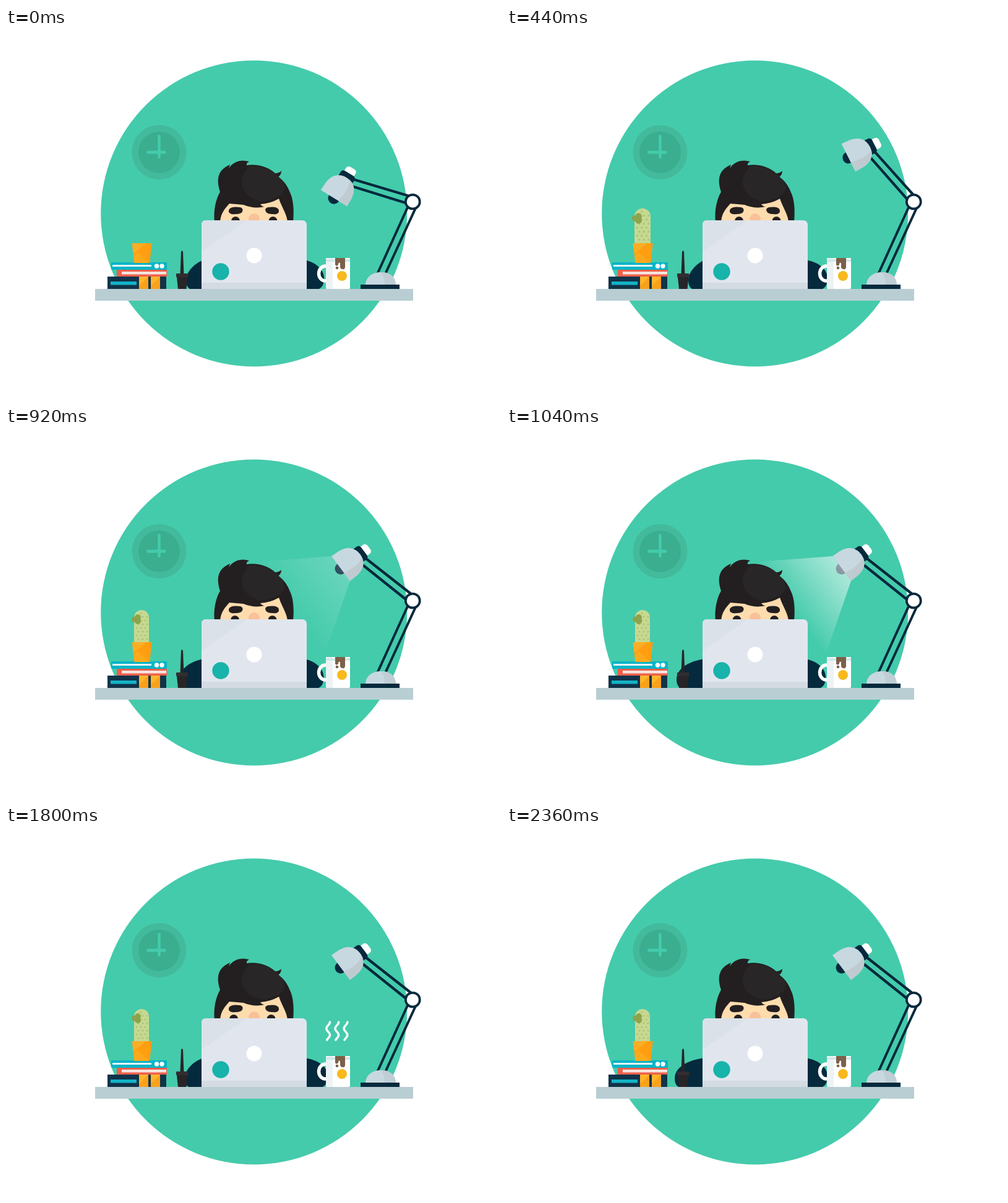
An HTML page with a canvas for the animation above (2.4 s loop, 800 by 600 pixels).

```html
<!DOCTYPE html>
<html lang="en">
<head>
<meta charset="utf-8">
<title>Late at the desk</title>
<style>
html, body { margin: 0; width: 100%; height: 100%; overflow: hidden; background: #fff; }
canvas { display: block; width: 800px; height: 600px; }
</style>
</head>
<body>
<canvas id="stage" width="800" height="600"></canvas>
<script>
const ctx = document.getElementById('stage').getContext('2d');
const LOOP = 2400, STEP = 40;
const GREEN = '#44cbab', NAVY = '#05293d', HAIR = '#231f20', WHITE = '#fff', STEEL = '#c8d8e0';

// Keyed values as [time, value] pairs, eased in and out between neighbours.
const tracks = {
  lamp: [[0, -21.5], [400, 10.5], [440, 10], [700, 0]],
  cactus: [[40, 0], [360, 1.1], [440, 1.08], [640, 1]],
  beam: [[880, 0], [980, 1], [1120, 1], [1240, 0]],
  eyes: [[0, 0], [440, 4], [760, -3.3], [1040, 0.5], [1360, 0.5], [1800, -3], [2360, 2.5]],
  leftArm: [[0, 291], [220, 273], [440, 293], [600, 272], [760, 289], [1040, 274], [1200, 291],
    [1360, 273], [1510, 291], [1650, 273], [1800, 289], [1990, 272], [2170, 291], [2360, 271]],
  rightArm: [[0, 514], [440, 518], [760, 511], [1040, 515], [1360, 521], [1800, 520], [2360, 518]],
  steamHead: [[1080, 360], [1360, 339], [1760, 317]],
  steamTail: [[1340, 360], [1800, 346], [2200, 317]]
};

function valueAt(keys, t) {
  if (t <= keys[0][0]) return keys[0][1];
  for (let i = 1; i < keys.length; i++) {
    const [t0, a] = keys[i - 1], [t1, b] = keys[i];
    if (t <= t1) return a + (b - a) * (0.5 - Math.cos(Math.PI * (t - t0) / (t1 - t0)) / 2);
  }
  return keys[keys.length - 1][1];
}

function rect(color, x, y, w, h, r = 0) {
  ctx.fillStyle = color;
  ctx.beginPath();
  ctx.roundRect(x, y, w, h, r);
  ctx.fill();
}
function disc(color, x, y, r) {
  ctx.fillStyle = color;
  ctx.beginPath();
  ctx.arc(x, y, r, 0, 7);
  ctx.fill();
}
function shape(color, d) {
  ctx.fillStyle = color;
  ctx.fill(new Path2D(d));
}
function line(color, width, d, cap = 'butt') {
  ctx.strokeStyle = color;
  ctx.lineWidth = width;
  ctx.lineCap = cap;
  ctx.lineJoin = 'round';
  ctx.stroke(new Path2D(d));
}
function grouped(draw) {
  ctx.save();
  draw();
  ctx.restore();
}

function drawBackdrop() {
  rect(WHITE, 0, 0, 800, 600);
  disc(GREEN, 400.7, 300, 247.5);
  disc('#43ba9c', 247.5, 201, 44);
  disc('#3aae8f', 247.5, 201, 33.5);
  line(GREEN, 4.5, 'M247.5 175V209', 'round');
  line(GREEN, 5, 'M229.5 201H256', 'round');
}

function drawLampHead(beam) {
  const toHead = () => { ctx.translate(541, 229); ctx.rotate(53.13 * Math.PI / 180); };
  grouped(() => { toHead(); disc(NAVY, 0, 0, 9.5); });
  if (beam > 0) grouped(() => {
    const glow = ctx.createLinearGradient(541, 229, 456, 293);
    glow.addColorStop(0, 'rgba(255,255,255,.55)');
    glow.addColorStop(1, 'rgba(255,255,255,0)');
    ctx.globalAlpha = beam;
    shape(glow, 'M526 209L556 249L515 368L405 218Z');
  });
  grouped(() => {
    toHead();
    rect(WHITE, -9, -57, 18, 18, 5);
    rect(NAVY, -13, -47, 26, 16, 5);
    shape(STEEL, 'M-25 0L-24.5 -14C-23 -33 -11 -39 0 -39C11 -39 23 -33 24.5 -14L25 0Z');
    shape('#bfcbd1', 'M8 0C12 -14 12 -28 6 -38.5C15 -37 23 -30 24.5 -14L25 0Z');
  });
}

function drawLamp(t) {
  line(NAVY, 4, 'M650 288L600 398M663 289L611 402');
  shape(STEEL, 'M581 416C581 388 630 388 630 416Z');
  shape('#bfcdd4', 'M612 416C612 405 610 399 605 395C620 394 630 402 630 416Z');
  rect(NAVY, 573, 415, 63, 7);
  grouped(() => {
    ctx.translate(657, 281);
    ctx.rotate(valueAt(tracks.lamp, t) * Math.PI / 180);
    ctx.translate(-657, -281);
    line(NAVY, 4.2, 'M577 209L656 271M574 221L649 281');
    drawLampHead(valueAt(tracks.beam, t));
  });
  disc(NAVY, 657.3, 281, 13.3);
  disc(WHITE, 657.3, 281, 9.6);
}

function drawArms(t) {
  const l = valueAt(tracks.leftArm, t), r = valueAt(tracks.rightArm, t);
  shape(NAVY, `M320 375C${l + 16} 379 ${l} 393 ${l} 408Q${l} 418 ${l + 6} 422H320Z`);
  shape(NAVY, `M482 375C${r - 16} 378 ${r} 389 ${r} 405Q${r} 418 ${r - 8} 422H482Z`);
}

function drawPerson(t) {
  const gaze = valueAt(tracks.eyes, t);
  shape('#ffdcae', 'M345 270H456V318H345Z');
  disc('#f9c199', 401, 309, 9);
  disc(HAIR, 371 + gaze, 312, 7);
  disc(HAIR, 431.5 + gaze, 312, 7);
  shape(HAIR, 'M360 297C359 289 371 289 379 290Q384 292 382 297Q380 301 371 301Q361 302 360 297Z');
  shape(HAIR, 'M441 297C442 289 431 289 423 290Q417 292 420 297Q422 301 431 301Q440 302 441 297Z');
  shape(HAIR, `M337 314C335 295 339 277 346 265C340 246 341 230 362 221L360 227
    C367 216 380 212 393 216Q388 218 389 222C407 219 426 226 435 235Q441 235 445 231
    Q445 237 440 241C450 247 456 258 459 266C464 276 466 293 464 314H455
    C454 301 447 293 441 276Q427 284 411 285Q414 289 418 289Q401 293 384 286
    Q374 285 361 284C354 292 347 299 346 314Z`);
  shape('#292627', 'M393 224C386 232 381 240 381 250C381 263 393 276 411 280Q429 280 442 271C455 263 452 252 441 241Q433 232 420 227Q405 222 393 224Z');
}

function drawLaptop() {
  rect('#e1e6ee', 316, 311, 170, 116, 7);
  shape('#dae1e9', 'M316 362V318Q316 311 323 311H389Z');
  rect('#d3dbe3', 316, 412, 170, 12);
  disc(WHITE, 401, 368, 12.5);
  disc('#18b3aa', 347, 394, 13.7);
}

function drawCactus(t) {
  const size = valueAt(tracks.cactus, t);
  if (size <= 0) return;
  grouped(() => {
    ctx.translate(219, 350);
    ctx.scale(size, size);
    rect('#c7d990', -12, -54, 24, 56, [12, 12, 0, 0]);
    for (let row = 0; row < 9; row++)
      for (let col = 0; col < 3; col++) {
        const x = -8 + col * 7 + (row % 2) * 3;
        if (row > 0 || col === 1) disc('#adc47d', x, -49 + row * 6, 1.6);
      }
    disc('#8ca34d', -6, -42, 5);
    disc('#8ca34d', -11.5, -39, 4.5);
    disc('#8ca34d', -6, -36, 5);
  });
}

function drawBooks() {
  rect('#06b4c7', 170, 379, 90, 12, [1, 0, 0, 1]);
  rect('#e9f7f7', 172, 383, 63, 3);
  disc(WHITE, 243.5, 385, 3.7);
  disc(WHITE, 252, 385, 3.7);
  rect('#ee5f4b', 179, 391, 81, 11);
  rect('#f6e4df', 187, 394, 72, 4.5);
  rect('#123349', 164, 402, 95, 20);
  rect('#13b3c7', 169, 410, 42, 5.5);
  for (const x of [215, 234]) {
    rect('#f8a21c', x, 402, 15, 20);
    shape('#ffb42c', `M${x} 402H${x + 15}L${x} 417Z`);
  }
  shape('#fbae25', 'M203.5 348H235.5L232 380H207.5Z');
  shape('#ff9e10', 'M227 348H235.5L232 380H207.5L206 365Z');
  shape('#fcaa1c', 'M213 363L232 380H207.5L206 367Z');
}

function drawPen() {
  shape('#272528', 'M283 362Q284.500 358 286 362L287.500 399H281.500Z');
  rect('#302e31', 275, 397, 19.5, 6, 1);
  shape('#272528', 'M276 403H293.500L291.500 422H278Z');
}

function drawMug() {
  ctx.strokeStyle = WHITE;
  ctx.lineWidth = 5.5;
  ctx.beginPath();
  ctx.ellipse(516, 397, 10.5, 12, 0, 0, 7);
  ctx.stroke();
  rect(WHITE, 517, 372, 39, 50, [1, 1, 2, 2]);
  rect('#edf3f5', 517, 372, 11, 50, [1, 0, 0, 2]);
  rect('#d2e9e8', 517, 374, 39, 4);
  shape('#7c6049', 'M532 372H548V387Q547 391 544 390Q540 390 540 386V380Q537 378 537 383Q534 386 532 383Z');
  disc('#7c6049', 535, 388, 2.3);
  disc('#f7b91d', 543, 401, 8);
}

function drawSteam(t) {
  const head = valueAt(tracks.steamHead, t), tail = valueAt(tracks.steamTail, t);
  if (tail - head < 1) return;
  ctx.strokeStyle = WHITE;
  ctx.lineWidth = 3.5;
  ctx.lineCap = ctx.lineJoin = 'round';
  for (const x of [520.7, 534.8, 549]) {
    ctx.beginPath();
    for (let y = head; y <= tail; y += 0.5)
      ctx.lineTo(x + 2.8 * Math.cos(2 * Math.PI * (y - 317) / 21), y);
    ctx.stroke();
  }
}

function drawScene(t) {
  drawBackdrop();
  drawLamp(t);
  drawArms(t);
  drawPerson(t);
  drawLaptop();
  drawCactus(t);
  drawBooks();
  drawPen();
  drawMug();
  drawSteam(t);
  rect('#b9ced3', 144, 422, 514, 19);
}

function tick(now) {
  drawScene(Math.floor(now % LOOP / STEP) * STEP);
  requestAnimationFrame(tick);
}
drawScene(0);
requestAnimationFrame(tick);
</script>
</body>
</html>
```
